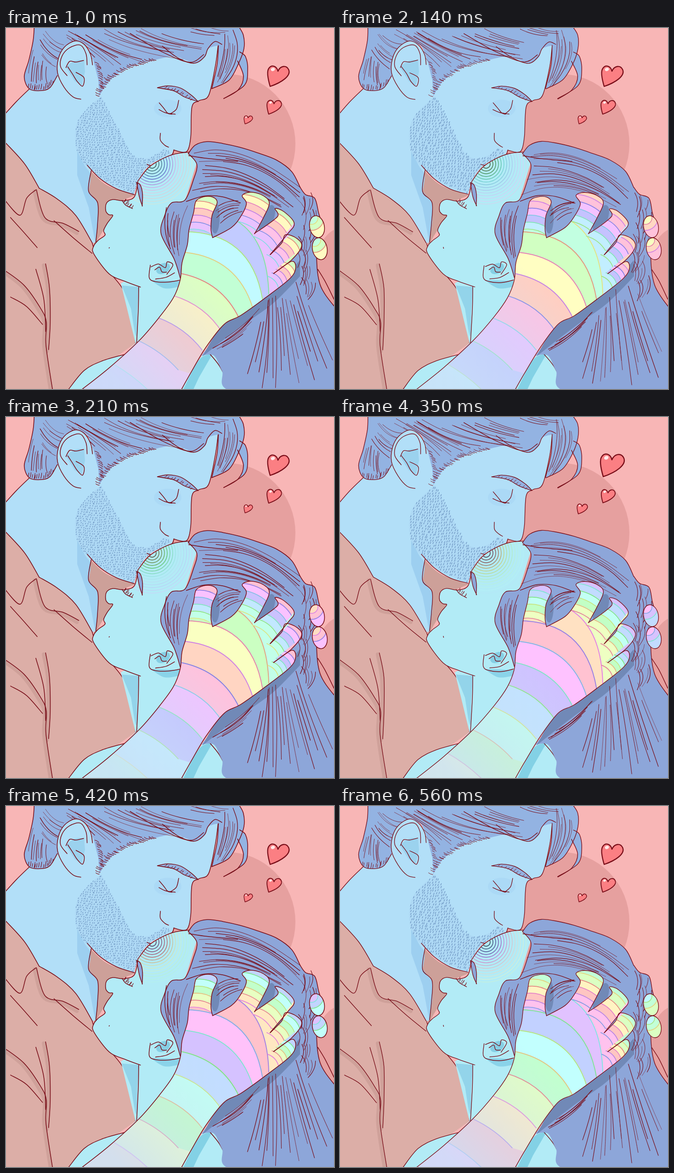
These frames come from a looping animation (714 by 785 pixels, 0.63 s). An HTML page with a canvas:

```html
<!DOCTYPE html>
<html lang="en">
<head>
<meta charset="utf-8">
<title>Kiss</title>
<style>
html, body { margin: 0; width: 100%; height: 100%; overflow: hidden; background: #f8b6b6; }
canvas { display: block; }
</style>
</head>
<body>
<canvas id="stage" width="714" height="785"></canvas>
<script>
const ctx = document.getElementById('stage').getContext('2d');
const INK = '#780d18', HIS = '#b2dff8', HER = '#b2ebf6', HIS_HAIR = '#93b3e2', HER_HAIR = '#8da6d9';
const STEP = 70, STEPS = 9;
// Three line styles take turns
const POSES = [
  { seed: 11, width: 1.55, grid: 5, dash: 1.7 },
  { seed: 37, width: 2, grid: 6.3, dash: 3.6 },
  { seed: 73, width: 1.35, grid: 6, dash: 3.2 }
];
let pose, step, seed;

const rnd = () => (seed = (seed * 1664525 + 1013904223) >>> 0) / 4294967296;
const wobble = size => (rnd() - .5) * 2 * size;
const parse = text => text.split(' ').map(p => p.split(',').map(Number));
const back = text => text.split(' ').reverse().join(' ');
const mix = (a, b, f) => a + (b - a) * f;
const bezier = ([a, b, c], t) => [0, 1].map(i =>
  a[i] * (1 - t) ** 2 + 2 * b[i] * t * (1 - t) + c[i] * t * t);

// The rainbow: bands count from the palm, negative towards the fingertips
const hue = k => 185 - 40 * step - 46 * k;
const pastel = k => `hsl(${hue(k)} 100% 88%)`;
const lineColor = k => `hsl(${hue(k + 2)} 65% 70%)`;

function addSpline(path, points) {
  const at = i => points[Math.max(0, Math.min(points.length - 1, i))];
  path.lineTo(...points[0]);
  for (let i = 0; i < points.length - 1; i++) {
    const [a, b, c, d] = [at(i - 1), at(i), at(i + 1), at(i + 2)];
    path.bezierCurveTo(b[0] + (c[0] - a[0]) / 6, b[1] + (c[1] - a[1]) / 6,
      c[0] - (d[0] - b[0]) / 6, c[1] - (d[1] - b[1]) / 6, ...c);
  }
  return path;
}
// Closed area: smooth along each edge, sharp where edges meet
function region(...edges) {
  const path = new Path2D();
  edges.forEach(edge => addSpline(path, parse(edge)));
  path.closePath();
  return path;
}
function ellipse(x, y, rx, ry, angle = 0) {
  const path = new Path2D();
  path.ellipse(x, y, rx, ry, angle, 0, Math.PI * 2);
  return path;
}
function fill(path, color) {
  ctx.fillStyle = color;
  ctx.fill(path);
}
function stroke(path, color, width) {
  ctx.strokeStyle = color;
  ctx.lineWidth = width;
  ctx.stroke(path);
}
function ink(...lines) {
  for (const line of lines) {
    const points = parse(line).map(p => p.map(v => v + wobble(.6)));
    stroke(addSpline(new Path2D(), points), INK, pose.width);
  }
}
function clipped(path, draw) {
  ctx.save();
  ctx.clip(path);
  draw();
  ctx.restore();
}
// Loose locks between two three-point guides, each covering part of the way
function strands(from, to, count) {
  const a = parse(from), b = parse(to);
  for (let i = 0; i < count; i++) {
    const f = (i + rnd()) / count, start = rnd() * .35, end = 1 - rnd() * .3;
    const guide = a.map((p, k) => p.map((v, j) => mix(v, b[k][j], f) + wobble(4)));
    const points = [0, .25, .5, .75, 1].map(t => bezier(guide, mix(start, end, t)));
    stroke(addSpline(new Path2D(), points), INK, pose.width * (.4 + rnd() * .5));
  }
}
// Short hairs growing off a line
function hatch(line, dx, dy, gap = 5) {
  const points = parse(line), path = new Path2D();
  points.slice(1).forEach((q, i) => {
    const p = points[i], count = Math.hypot(q[0] - p[0], q[1] - p[1]) / gap;
    for (let k = 0; k < count; k++) {
      const x = mix(p[0], q[0], k / count) + wobble(1.5), y = mix(p[1], q[1], k / count) + wobble(1.5);
      const len = .5 + rnd() * .6;
      path.moveTo(x, y);
      path.quadraticCurveTo(x + dx * len * .7, y + dy * len * .3, x + dx * len, y + dy * len);
    }
  });
  stroke(path, INK, pose.width * .7);
}

const collarBack = '72,348 40,295 -5,245', collar = '188,468 152,408 112,372 72,348';
const shirtFront = '188,468 203,505 250,562 272,610 282,685';
const shoulder = '137,785 170,745 210,724 258,710';
const forehead = '287,333 310,304 340,284 370,273 402,270';
const temple = '397,273 416,296 408,330 390,374 360,380 346,408 338,448 366,502 380,545';

function background() {
  ctx.fillStyle = '#f8b6b6';
  ctx.fillRect(0, 0, 714, 785);
  fill(ellipse(480, 252, 150, 152), '#e6a09f');
  fill(ellipse(730, 540, 60, 105), '#e6a09f');
  ink('679,525 694,550 714,590');
}

function shirt() {
  const folds = ['-5,525 40,560 75,610 88,640 87,690 102,790', '86,513 95,565 96,640 93,700',
    '66,352 85,412 125,425 158,443'];
  fill(region(back(collarBack), back(collar), shirtFront, '135,790 -5,790'), '#dcaea7');
  folds.forEach(line => {
    ctx.save();
    ctx.translate(-4, 3);
    stroke(addSpline(new Path2D(), parse(line)), '#cfa19a', 8);
    ctx.restore();
  });
  fill(region('183,310 220,342 280,364', '240,380 236,405 212,440 192,474', '185,440 178,355'), '#cda099');
  ink(...folds, shirtFront, '-5,372 30,407 45,370 65,352', '65,525 82,590 87,660',
    '10,585 45,605 80,645', '105,419 145,455 187,490', '10,412 40,445 68,478');
}

function herBody() {
  fill(region(shoulder, '282,685 250,555', '400,480 420,640 300,790'), HER);
  fill(region('252,560 290,563', '286,610 283,670 272,610'), '#93d4ea');
  fill(region('380,790 425,715 450,706 500,790'), HER);
  fill(region('384,790 420,722 450,708', '420,760 406,790'), '#83d1e5');
  ink(shoulder, '289,563 288,610 284,685', '440,705 465,735 490,785');
}

function beard() {
  const area = region('207,148 160,195 151,245 165,288 215,333 279,362',
    '286,335 309,302 360,272', '345,262 310,283 275,275 246,222 207,148');
  const hairs = new Path2D(), g = pose.grid;
  for (let y = 148; y < 362; y += g) {
    for (let x = 148; x < 362; x += g) {
      const px = x + wobble(2), py = y + Math.sin(x / 14) * 2 + wobble(.8);
      if (!ctx.isPointInPath(area, px, py)) continue;
      hairs.moveTo(px, py);
      hairs.lineTo(px + pose.dash * .45, py - pose.dash);
    }
  }
  fill(area, '#a5cdeb60');
  stroke(hairs, '#688fbd', 1.2);
}

function hisFace() {
  const neck = '-5,190 22,160 50,133', throat = '185,310 180,355 200,380 199,425 195,466';
  const profile = '462,38 456,85 441,147 420,158 405,172 402,235 396,264 386,270 365,265';
  const jaw = '279,362 240,350 205,328 177,299';
  fill(region(neck, '100,60 300,30', profile, '360,277 335,286 309,302 287,333 279,362',
    jaw, throat, collar, collarBack), HIS);
  fill(region('155,268 172,300 184,320 180,355', '200,380 201,420 194,466', '180,390 155,320'), '#9dcff0');
  fill(ellipse(352, 175, 30, 19), '#a3d2f170');
  beard();
  ink(neck, profile, jaw, throat, collar, collarBack,
    '336,229 336,244 346,255 354,259', '333,163 343,174 352,185 361,187', '358,187 371,176 376,157',
    '333,177 348,184 368,187', '365,265 362,275 352,279', '307,296 315,299 322,295');
  const brow = '330,130 352,126 380,131 404,146 418,160', under = '418,160 390,150 365,136 330,130';
  fill(region(brow, under), HIS_HAIR);
  ink(brow, under);
  hatch('345,130 372,138 405,157', 5, -4, 7);
}

function hisHair() {
  const nape = '61,-5 59,28 50,70 40,106 51,132 75,136 95,130 112,104';
  const hairline = '203,148 226,114 270,84 330,68 368,62 410,76 432,64 440,45 462,38';
  const front = '462,38 460,80 448,132', fringe = '448,132 485,113 507,77 518,45 517,15 505,-5';
  const wisp = '508,52 521,62 526,92 518,125 474,154', wispBack = '474,154 505,135 517,105 504,72';
  fill(region(nape, '125,45 175,38 201,112', hairline, front, fringe), HIS_HAIR);
  fill(region(wisp, wispBack), HIS_HAIR);
  ink(nape, front, fringe, wisp, wispBack, '340,40 375,65 410,77 432,62 440,45 455,30 470,36',
    '270,12 340,52 400,74 430,58');
  strands('63,38 75,75 112,95', '85,0 115,35 140,32', 8);
  strands('90,0 170,30 208,100', '170,0 240,60 330,67', 11);
  strands('170,0 250,55 400,70', '320,0 370,25 440,34', 10);
  strands('62,45 50,85 46,118', '88,70 80,105 92,128', 8);
  strands('470,5 478,60 450,130', '495,5 525,60 465,125', 8);
  strands('365,-5 410,20 460,18', '430,-5 460,10 490,5', 4);
  hatch('48,128 62,135 85,133 102,122', 2, -11);
  hatch('202,148 226,114 270,86 330,69', -12, -5);
  hatch('193,75 202,98 204,128', 10, 6);
}

function hisEar() {
  const rim = '188,80 184,58 170,36 150,28 127,42 114,66 112,98 126,128 146,150 163,155';
  fill(region(rim, '180,125 187,90'), HIS);
  fill(region('130,85 150,71 170,70', '172,95 165,126', '150,116 130,85'), '#9bd2ee');
  ink(rim, '133,104 119,84 122,60 138,43 162,37 174,56 176,80', '131,86 138,73 152,74 169,70',
    '134,84 145,100 155,116 167,126 170,108 152,97');
}

function ripples() {
  const count = 14;
  for (let i = 0; i < count; i++) {
    const f = i / (count - 1), radius = 9 + i * 6;
    const light = 24 + Math.min(1, f * 1.5) * 60;
    stroke(ellipse(318, 296, radius, radius),
      `hsl(${170 - 40 * step + 230 * f} ${30 + f * 50}% ${light}% / ${1 - f * .6})`, 1.4);
  }
}

function herFace() {
  const profile = '287,333 279,367 256,376 232,373 219,381 217,397 224,406 232,408 220,424 212,440 216,450 201,462 191,474 191,491 225,535 258,551 293,563';
  const brow = '284,336 292,342 297,362 297,387', lobe = '314,516 312,543 325,552 352,553 378,548';
  const face = region(profile, '385,570 385,500 370,420 390,374 416,290', back(forehead));
  fill(face, HER);
  clipped(face, ripples);
  fill(region('315,548 380,550', '380,562 345,566 315,548'), '#8ad3e9');
  fill(region(brow, '290,368 284,336'), HER_HAIR);
  fill(ellipse(342, 523, 16, 11, -.5), '#86cfe4');
  ink(profile, forehead, brow, '297,387 290,368 284,336', lobe,
    '316,519 332,513 347,521 351,509 363,515 350,535', '324,526 335,520 339,530 350,531',
    '326,546 348,542 367,532', '253,375 260,385 275,393', '225,477 225,479');
  hatch('256,378 264,386 273,391', 6, -8, 3);
}

function herHair() {
  const crown = '397,273 412,255 438,247 472,251 510,259 548,272 588,287 622,312 640,347';
  const braid = '640,347 652,362 672,370 680,400 687,435 677,480 684,558 720,612';
  fill(region(crown, braid, '720,790 495,790 470,745 452,712 425,713', '470,655 400,560', back(temple)), HER_HAIR);
  fill(region('428,714 470,650 560,585 640,505', '640,540 580,600 510,650 428,714'), '#7189b7');
  fill(ellipse(455, 412, 10, 35), '#7189b7');
  fill(ellipse(568, 415, 14, 32, .4), '#7189b7');
  ink(crown, braid, temple, '392,377 430,365 470,367 510,380', '398,278 440,284 505,290');
  strands('403,275 500,240 640,350', '415,298 560,280 645,390', 6);
  strands('415,296 530,290 640,400', '392,372 490,320 610,398', 10);
  strands('455,392 480,370 512,375', '457,438 485,405 515,402', 7);
  strands('352,388 338,435 360,484', '398,378 370,435 384,508', 9);
  strands('556,597 545,680 505,785', '635,540 670,640 735,770', 18);
  strands('430,710 490,690 535,645', '450,695 515,660 556,600', 6);
  // Overlapping tufts down the plait
  for (let i = 0; i < 7; i++) {
    const x = 645 + Math.sin(i * 1.2) * 8, y = 355 + i * 30;
    strands(`${x - 15},${y} ${x + 10},${y + 20} ${x - 5},${y + 55}`,
      `${x + 22},${y + 5} ${x + 35},${y + 30} ${x + 8},${y + 60}`, 4);
  }
}

function farFingertip(x, y) {
  const tip = ellipse(x, y, 16, 24, -.2);
  fill(tip, pastel(-5));
  clipped(tip, () => [27, 14].forEach((r, i) => {
    const spot = ellipse(x - 12, y - 19, r, r);
    fill(spot, pastel(-6 - i));
    stroke(spot, lineColor(-6 - i), 1.6);
  }));
  stroke(tip, INK, pose.width);
}

// Curve across the arm; t runs from the knuckles (-.4) over the palm (0) to the elbow (1)
function armCurve(t) {
  const left = bezier([[394, 490], [388, 604], [237, 733]], t);
  const right = bezier([[534, 605], [471, 658], [312, 790]], t);
  const bulge = 52 * Math.exp(-2.2 * t);
  const path = new Path2D();
  path.moveTo(left[0] - 3, left[1] - 2);
  path.quadraticCurveTo((left[0] + right[0]) / 2 + bulge * .75, (left[1] + right[1]) / 2 - bulge * .9,
    right[0] + 3, right[1] + 3);
  return path;
}
function armBands() {
  for (let k = -1; k <= 6; k++) {
    const line = armCurve((k - 1) / 5), area = new Path2D(line);
    area.lineTo(560, 800);
    area.lineTo(130, 800);
    area.lineTo(330, 450);
    fill(area, pastel(k));
    stroke(line, lineColor(k), 1.9);
  }
}
function fingerBands(axis, half) {
  const [[x0, y0], [x1, y1]] = parse(axis), length = Math.hypot(x1 - x0, y1 - y0), count = 5;
  ctx.save();
  ctx.translate(x0, y0);
  ctx.rotate(Math.atan2(y1 - y0, x1 - x0));
  for (let i = 0; i < count; i++) {
    const x = length * i / count, line = new Path2D();
    line.moveTo(x - 4, -half);
    line.quadraticCurveTo(x + 7, 0, x - 4, half);
    const area = new Path2D(line);
    area.lineTo(length + 12, half);
    area.lineTo(length + 12, -half);
    fill(area, pastel(-2 - i));
    stroke(line, lineColor(-2 - i), 1.7);
  }
  ctx.restore();
}

function hand() {
  const edges = [
    '165,787 225,739 290,680 335,628 365,587 379,548 383,510 395,472 399,438 408,402 413,376 430,367 450,368 460,379 448,408 446,438 450,456',
    '450,456 490,434 510,410 523,382 514,364 532,357 558,364 573,380 560,412 541,447',
    '541,447 566,430 592,408 586,393 606,400 628,425 612,448 575,493',
    '575,493 600,468 609,450 633,457 643,475 622,504 583,534',
    '583,534 621,508 630,522 616,546 562,588 510,626 475,644 435,695 402,750 381,787'
  ];
  const outline = region(...edges);
  clipped(outline, () => {
    ctx.fillStyle = pastel(-2);
    ctx.fillRect(150, 340, 520, 460);
    armBands();
    fingerBands('422,440 437,364', 27);
    fingerBands('522,428 553,357', 33);
    fingerBands('560,466 613,398', 27);
    fingerBands('585,507 641,460', 22);
    fingerBands('585,552 631,514', 19);
    const fade = ctx.createLinearGradient(440, 555, 235, 765);
    fade.addColorStop(0, '#c8dff800');
    fade.addColorStop(.45, '#c8dff855');
    fade.addColorStop(1, '#c8dff8cc');
    ctx.fillStyle = fade;
    ctx.fillRect(130, 480, 430, 320);
  });
  ink(...edges);
}

function heart(x, y, size) {
  ctx.save();
  ctx.translate(x, y);
  ctx.scale(size, size);
  const path = new Path2D('M-18 24C-23 7-26-8-21-15C-15-24-4-21-1-9C4-21 17-23 22-13C29 1 6 16-18 24Z');
  fill(path, '#fb7f83');
  stroke(path, INK, 2.3 / Math.sqrt(size));
  fill(ellipse(-12, -13, 4.5, 3.5, -.4), '#ffe9e9');
  ctx.restore();
}
// One beat per loop: swell, then shrink; the middle heart moves against the others
function hearts() {
  const beat = step >= 5 && step <= 7 ? (6 - step) * .11 : 0;
  heart(593, 103, 1 + beat);
  heart(584, 171, .68 * (1 - beat * .4));
  heart(527.5, 199, .4 * (1 + beat * 2));
}

function draw() {
  pose = POSES[step % 3];
  seed = pose.seed;
  ctx.lineCap = ctx.lineJoin = 'round';
  [background, shirt, herBody, hisFace, hisHair, hisEar, herFace, herHair].forEach(layer => layer());
  farFingertip(677, 432);
  farFingertip(683, 480);
  hand();
  hearts();
}

function tick() {
  const next = Math.floor(performance.now() / STEP) % STEPS;
  if (next !== step) {
    step = next;
    draw();
  }
  requestAnimationFrame(tick);
}
tick();
</script>
</body>
</html>
```
